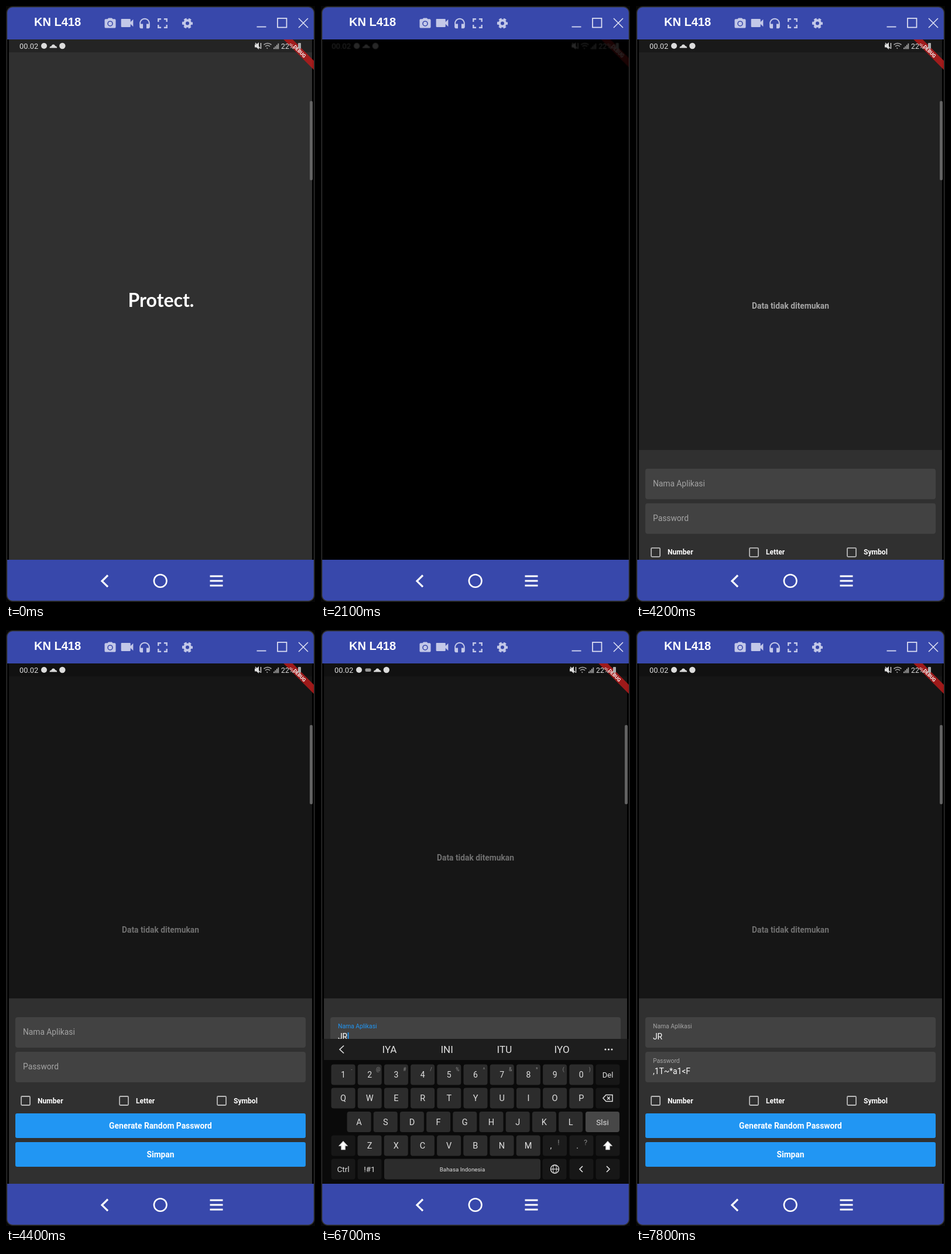
These frames come from a looping animation (528 px wide and 1016 px high, 8000 ms). An HTML page:

```html
<!DOCTYPE html>
<html lang="id">
<head>
<meta charset="utf-8">
<title>Password app</title>
<style>
html, body { margin: 0; height: 100%; overflow: hidden; background: #070707; }
#stage { display: block; width: 100vw; height: 100vh; }
text { font-family: Roboto, sans-serif; white-space: pre; }
.b { font-weight: 700; }
.m { text-anchor: middle; }
</style>
</head>
<body>
<svg id="stage" viewBox="0 0 528 1016"></svg>
<script>
const rect = (x, y, w, h, fill, r = 0, more = '') =>
  `<rect x="${x}" y="${y}" width="${w}" height="${h}" rx="${r}" fill="${fill}" ${more}/>`;
const text = (x, y, s, size, fill, more = '') =>
  `<text x="${x}" y="${y}" font-size="${size}" fill="${fill}" ${more}>${s}</text>`;
const line = (d, color, w, more = '') =>
  `<path d="${d}" fill="none" stroke="${color}" stroke-width="${w}" ${more}/>`;
const dot = (x, y, r, fill, more = '') => `<circle cx="${x}" cy="${y}" r="${r}" fill="${fill}" ${more}/>`;
const icon = (cx, cy, scale, d, fill) =>
  `<path transform="translate(${cx} ${cy}) scale(${scale}) translate(-12 -12)" d="${d}" fill="${fill}" fill-rule="evenodd"/>`;
const BOLD = 'class="b"', MID = 'class="m"', BOLDMID = 'class="b m"';

const button = (id, x, y, w, label) => `<svg x="${x}" y="${y}" width="${w}" height="42">
  ${rect(0, 0, w, 42, '#2196f3', 3)}${dot(w / 2, 21, 0, '#fff', `id="${id}" opacity="0"`)}
  ${text(w / 2, 26, label, 13.8, '#fff', BOLDMID)}</svg>`;

const field = (id, y, label) => rect(16, y, 496, 52, '#424242', 4) +
  text(0, 0, label, 13.8, '#a4a4a4', `id="${id}Label"`) +
  text(29, y + 38, '', 13.8, '#fff', `id="${id}Value"`);

const check = (x, label) =>
  rect(x, 795, 15, 15, 'none', 1.5, 'stroke="#b9b9b9" stroke-width="1.8"') +
  text(x + 28, 806.5, label, 12.1, '#fff', BOLD);

// ---- window frame ----
function frame() {
  const c = '#c3c8e8', w = '#fff';
  return rect(1.5, 1.5, 525, 1013, '#3848ab', 10, 'stroke="#333" stroke-width="1.5"') +
    rect(2, 57, 524, 887, '#000') +
    text(48, 34, 'KN L418', 20, w, 'class="b" style="font-family:\'Liberation Sans\',Arial,sans-serif"') +
    icon(178, 29, .95, 'M9 3 7.2 5H4c-1.1 0-2 .9-2 2v12c0 1.1.9 2 2 2h16c1.1 0 2-.9 2-2V7c0-1.1-.9-2-2-2h-3.2L15 3zM12 8a5 5 0 1 0 .01 0z', c) +
    dot(178, 30, 3.2, c) +
    icon(207, 29, 1.15, 'M17 10.5V7c0-.6-.4-1-1-1H4c-.6 0-1 .4-1 1v10c0 .6.4 1 1 1h12c.6 0 1-.4 1-1v-3.5l4 4v-11z', c) +
    icon(237, 30, .98, 'M12 2.5c-5 0-9 4-9 9v6c0 1.7 1.3 3 3 3h3v-8H5v-1c0-3.9 3.1-7 7-7s7 3.1 7 7v1h-4v8h3c1.7 0 3-1.3 3-3v-6c0-5-4-9-9-9z', c) +
    icon(267.5, 29.5, 1.2, 'M7 14H5v5h5v-2H7zM5 10h2V7h3V5H5zM17 17h-3v2h5v-5h-2zM14 5v2h3v3h2V5z', c) +
    dot(310, 29.5, 5, 'none', `stroke="${c}" stroke-width="4"`) +
    dot(310, 29.5, 7.6, 'none', `stroke="${c}" stroke-width="3" stroke-dasharray="4.6 3.36" stroke-dashoffset="2.3"`) +
    line('M428.500 35.500H444.500', '#d5d9f2', 1.8) +
    rect(464, 21, 15.5, 15.5, 'none', 0, 'stroke="#e3e5f5" stroke-width="1.7"') +
    line('M500 21l16 16m0-16l-16 16', '#e3e5f5', 1.5) +
    line('M174 970.500l-10 9.800 10 9.800', w, 3.2) +
    dot(263.7, 980, 10.8, 'none', 'stroke="#fff" stroke-width="2.6"') +
    line('M348.500 972h22m-22 8h22m-22 8h22', w, 3.2);
}

// ---- app pages ----
const page = (id, body) => `<g id="${id}">${rect(5, 57, 518, 887, '#303030')}${body}</g>`;

const splash = page('splash', text(265, 513, 'Protect.', 32, '#fff',
  'class="b m" style="font-family:Lato,sans-serif"'));

const login = page('login', rect(13, 446, 502, 52, '#424242', 4) +
  text(26, 476, 'Masukkan PIN', 13.8, '#9c9c9c') +
  text(264, 513, 'Masukkan pin dan otomatis akan masuk', 12.1, '#fff', BOLDMID) +
  button('loginRipple', 13, 537, 502, 'Masuk dengan autentikasi lokal'));

const home = page('home', text(264, 0, 'Data tidak ditemukan', 13.8, '#fff', 'id="empty" class="b m"') +
  rect(5, 57, 518, 887, '#000', 0, 'id="barrier"') +
  `<g id="sheet">${rect(5, 628, 518, 317, '#303030')}` +
  field('name', 660, 'Nama Aplikasi') + field('pass', 719, 'Password') +
  rect(29, 686, 1.8, 15, '#2196f3', 0, 'id="caret"') +
  check(26, 'Number') + check(194, 'Letter') + check(361, 'Symbol') +
  button('genRipple', 16, 824, 496, 'Generate Random Password') +
  button('saveRipple', 16, 873, 496, 'Simpan') + '</g>');

// ---- system layer ----
function status() {
  const c = '#dcdcdc';
  const cloud = 'M74.500 71.500q0-3 3-3 1-3 3.500-3 2.500 0 3.200 2.700 3 .3 3 3.300z';
  let bars = '';
  for (let i = 0; i < 4; i++) bars += rect(457 + i * 2.5, 71 - i * 2.4, 1.7, 2.4 + i * 2.4, '#aaa');
  return `<g id="status">${rect(5, 57, 518, 22, '#000', 0, 'opacity=".25"')}
    <g transform="rotate(45 502 77)">${rect(460, 71.5, 84, 11, '#b71c1c', 0, 'opacity=".85"')}
    ${text(502, 80.3, 'DEBUG', 8.3, '#fff', BOLDMID)}</g>
    ${text(23, 72.7, '00.02', 12.8, c)}${dot(65, 68, 5, c)}
    <g id="kbIcon">${rect(75.5, 65.5, 10, 5.5, '#999', 2)}</g>
    <g id="notes"><path d="${cloud}" fill="${c}"/>${dot(96.3, 68, 5.2, c)}</g>
    <path d="M425 65.500h3l4-3.500v12l-4-3.500h-3z" fill="${c}"/>
    ${line('M426 63l8 9m1.500-9v10', c, 1.4)}
    ${line('M440.500 66q6.500-5 13 0m-10.500 2.800q4-3 8 0m-5.500 2.500l1.500 1.500', '#aaa', 1.6)}${bars}
    ${text(470, 72.5, '22%', 12.3, c)}${rect(499, 63, 5, 10, '#aaa', 1)}</g>`;
}

// ---- keyboard ----
const STEP = 45.2;
function keyboard() {
  const light = '#e0e0e0', dark = '#171717', grey = '#2c2c2c';
  const key = (cx, cy, label, fill = grey, w = 41, size = 14, more = '', id = '') =>
    rect(cx - w / 2, cy - 17.5, w, 35, fill, 4, id && `id="${id}"`) +
    text(cx, cy + 5, label, size, light, more || MID);
  const rows = [['qwertyuiop', 38, 798], ['asdfghjkl', 65, 838.5], ['zxcvbnm', 83, 879]];
  let s = rect(2, 697, 524, 250, '#0a0a0a') + rect(5, 697, 518, 36, '#1d1d1d');
  [...'1234567890'].forEach((n, i) => {
    const x = 38 + i * STEP;
    s += key(x, 758, n) + text(x + 14.5, 752, '-@#/%^&*()'[i].replace('&', '&amp;'), 8.5, '#888', MID);
  });
  for (const [letters, x, y] of rows)
    [...letters].forEach((l, i) => s += key(x + i * STEP, y, l, grey, 41, 14.5, 'class="m letter"', 'key-' + l));
  s += key(490, 758, 'Del', dark, 41, 13) + key(490, 798, '', dark) +
    key(481, 838.5, 'Slsi', dark, 58, 13.5, 'class="m" id="doneText"', 'done') +
    key(38, 879, '', dark) + key(490, 879, '', dark) +
    key(393, 879, ',', dark, 0) + key(438, 879, '.', dark, 0) +
    rect(379, 861.5, 41, 35, '#fff', 4, 'opacity=".07"') + rect(424.5, 861.5, 41, 35, '#fff', 4, 'opacity=".07"') +
    text(406, 878, '!', 13, '#888', MID) + text(452, 878, '?', 13, '#888', MID) +
    key(38, 919, 'Ctrl', dark, 41, 13.5) + key(83, 919, '!#1', dark, 41, 13.5) +
    rect(108, 901.5, 267, 35, grey, 4) + text(241.5, 922.5, 'Bahasa Indonesia', 9.8, light, MID) +
    key(399, 919, '', dark) + key(445, 919, '', dark) + key(490, 919, '', dark);
  s += line('M482 798l5-5.500h11v11h-11zM489 795.500l5 5m0-5l-5 5', light, 1.5);
  for (const x of [38, 490])
    s += line(`M${x} 872l-6.500 7h3.500v6.500h6v-6.500h3.500z`, light, 1.5, 'class="shift"');
  s += dot(399.5, 919, 7, 'none', `stroke="${light}" stroke-width="1.4"`) +
    `<ellipse cx="399.5" cy="919" rx="3" ry="7" fill="none" stroke="${light}"/>` +
    line('M392.500 919h14', light, 1.2) +
    line('M447 914l-5 5 5 5M488 914l5 5-5 5', light, 1.7);
  s += `<g id="clip">${rect(185, 702, 95, 26, '#363636', 13)}${text(233, 719.5, 'bX_0h8b&amp;B', 12.6, light, MID)}
    ${line('M485 709l12 12m0-12l-12 12', light, 1.5)}</g><g id="words">${line('M39 708.500l-7 6.500 7 6.500', light, 1.7)}` +
    ['IYA', 'INI', 'ITU', 'IYO'].map((w, i) => text(117 + i * 98.2, 721, w, 17, light, MID)).join('') +
    [486, 491.5, 497].map(x => dot(x, 715, 1.6, light)).join('') + '</g>';
  return `<g id="keyboard">${s}</g>`;
}

const stage = document.getElementById('stage');
stage.innerHTML = `<clipPath id="screen">${rect(2, 57, 524, 887, '#000')}</clipPath>
  ${frame()}<g clip-path="url(#screen)"><g clip-path="url(#screen)">${splash}${login}${home}</g>
  ${keyboard()}${rect(2, 57, 524, 887, '#000', 0, 'id="black"')}${status()}
  ${rect(519, 162, 5, 135, '#626262', 2, 'id="handle"')}
  </g>`;

// ---- motion ----
const $ = id => document.getElementById(id);
const set = (id, attrs) => { for (const k in attrs) $(id).setAttribute(k, attrs[k]); };
const show = (id, on) => set(id, { display: on ? 'inline' : 'none' });
const part = (t, a, b) => Math.min(1, Math.max(0, (t - a) / (b - a)));
const out = p => 1 - (1 - p) ** 3;
const within = (t, a, b) => t >= a && t < b;
const letters = [...document.querySelectorAll('.letter')];
const shifts = [...document.querySelectorAll('.shift')];

function enter(id, t, start) {
  const p = part(t, start, start + 300);
  show(id, p > 0);
  set(id, { opacity: p * (2 - p), transform: `translate(0 ${220 * (1 - out(p))})` });
}

function ripple(id, t, start, end) {
  const p = part(t, start, end);
  set(id, { r: 260 * out(p), opacity: p > 0 ? .24 * Math.min(1, 2.5 * (1 - p)) : 0 });
}

function float(id, y, p, color) {
  set(id + 'Label', {
    transform: `translate(29 ${y + 30 - 11 * p}) scale(${1 - .25 * p})`, fill: color
  });
}

function draw(t) {
  enter('login', t, 50);
  enter('home', t, 3350);
  ripple('loginRipple', t, 850, 1500);

  // secure prompt blanks the screen
  const dim = t < 3300 ? out(part(t, 1650, 2100)) : 0;
  set('black', { opacity: dim });
  set('status', {
    opacity: 1 - .82 * dim,
    transform: `translate(264 68) scale(${1 + .02 * dim}) translate(-264 -68)`
  });
  set('handle', { opacity: 1 - dim });

  const open = out(part(t, 4130, 4400));
  set('sheet', { transform: `translate(0 ${317 * (1 - open)})` });
  set('barrier', { opacity: .54 * open });

  const rise = 1 - (1 - part(t, 5050, 5230)) ** 2.5;
  const drop = part(t, 6850, 7130) ** 2;
  show('keyboard', rise > 0 && drop < 1);
  set('keyboard', { transform: `translate(0 ${247 * (1 - rise + drop)})` });
  const lift = out(part(t, 5230, 5400)) - out(part(t, 6930, 7150));
  set('empty', { y: 515.5 - 123 * lift, opacity: .95, fill: '#fff' });

  const caps = t >= 5650;
  for (const el of letters) {
    const s = caps ? el.textContent.toUpperCase() : el.textContent.toLowerCase();
    if (s !== el.textContent) el.textContent = s;
  }
  for (const el of shifts) el.setAttribute('fill', caps ? '#fff' : 'none');
  set('key-j', { fill: within(t, 6000, 6120) ? '#555' : '#2c2c2c' });
  set('key-r', { fill: within(t, 6300, 6420) ? '#555' : '#2c2c2c' });
  const done = t >= 6650;
  set('done', { fill: done ? '#474747' : '#171717' });
  set('doneText', { fill: done ? '#e0e0e0' : '#4a86d8' });
  show('clip', t < 6050);
  show('words', t >= 6050);

  const focused = within(t, 5130, 6900);
  $('nameValue').textContent = 'JR'.slice(0, (t >= 6050) + (t >= 6350));
  const lastKey = t >= 6350 ? 6350 : t >= 6050 ? 6050 : 5130;
  show('caret', focused && (t - lastKey) % 1000 < 500);
  set('caret', { x: 29.5 + $('nameValue').getComputedTextLength() });
  float('name', 660, out(part(t, 5220, 5400)), within(t, 5220, 6900) ? '#2196f3' : '#a4a4a4');

  ripple('genRipple', t, 7550, 7790);
  $('passValue').textContent = t >= 7600 ? ',1T~*a1<F' : '';
  float('pass', 719, out(part(t, 7560, 7750)), '#a4a4a4');

  const notice = within(t, 5400, 7100);
  show('kbIcon', notice);
  set('notes', { transform: `translate(${notice ? 15.5 : 0} 0)` });
}

let start;
function tick(now) {
  start ??= now;
  draw((now - start) % 8000);
  requestAnimationFrame(tick);
}
draw(0);
requestAnimationFrame(tick);
</script>
</body>
</html>
```
